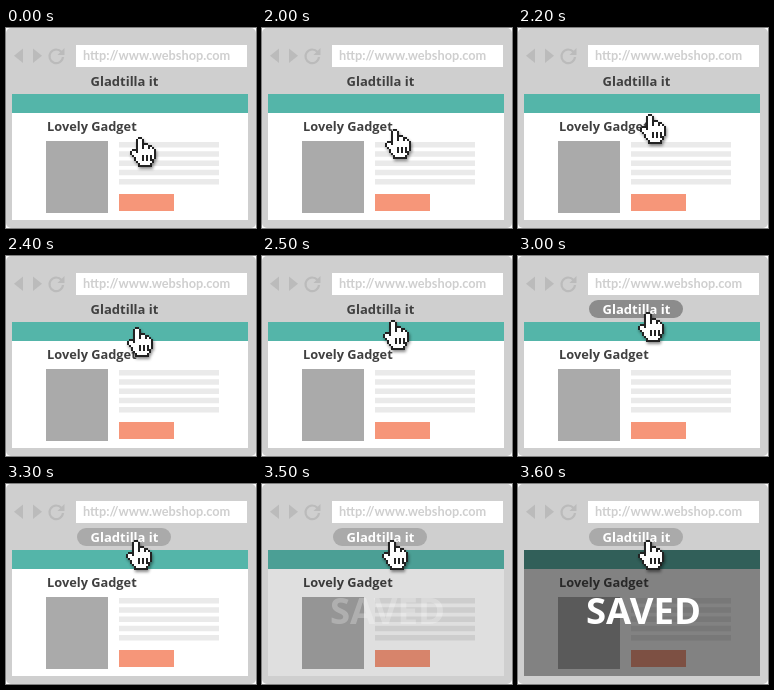
Write an HTML page that moves like this. It is 250 px wide and 200 px high and loops after 5600 ms.

```html
<!DOCTYPE html>
<html lang="en">
<head>
<meta charset="utf-8">
<title>Save to list</title>
<style>
  html, body { margin: 0; width: 100%; height: 100%; overflow: hidden; background: #fff; }
  svg { display: block; width: 100vw; height: 100vh; }
  text { font-family: "Open Sans", "Noto Sans", sans-serif; font-weight: 700; }
  .url { font-family: Lato, "Open Sans", sans-serif; }
  #hand { filter: drop-shadow(1px 2px 1.5px rgba(0, 0, 0, .45)); }
</style>
</head>
<body>
<svg viewBox="0 0 250 200">
  <rect width="250" height="200" rx="5" fill="#cfcfcf"/>

  <g fill="#bbb">
    <path d="M17 20.5v14.5L8 27.75zM27 20.5v14.5L36 27.75z"/>
    <path d="M55.5 24A6.8 6.8 0 1 0 57 29" fill="none" stroke="#bbb" stroke-width="2.2"/>
    <path d="M58.5 20v7H51.5z"/>
  </g>
  <rect x="70" y="17" width="171" height="22" fill="#fff"/>
  <text class="url" x="77" y="32" font-size="12.75" fill="#cfcfcf">http://www.webshop.com</text>

  <rect id="pill" x="71" y="44" width="94" height="18" rx="9"/>
  <text id="label" x="118.5" y="58" font-size="13" text-anchor="middle">Gladtilla it</text>

  <rect x="6" y="66" width="236" height="126" fill="#fff"/>
  <rect x="6" y="66" width="236" height="19" fill="#54b5a9"/>
  <text x="41" y="103" font-size="12.8" fill="#404040">Lovely Gadget</text>
  <rect x="40" y="113" width="62" height="72" fill="#aaa"/>
  <g id="lines" fill="#eaeaea"></g>
  <rect x="113" y="166" width="55" height="17" fill="#f69679"/>

  <rect id="shade" x="6" y="66" width="236" height="126" fill="#141414"/>
  <text id="saved" x="125.5" y="139.5" font-size="36.5" text-anchor="middle" fill="#fff">SAVED</text>

  <g id="hand">
    <g transform="scale(2)" shape-rendering="crispEdges">
      <path fill="#222" d="M4 0h2v1h1v2h2v1h2v1h1v1h1v5h-1v2h-1v2h-7v-2h-1v-1h-1v-2h-1v-1h-1v-2h1v-1h2v-5h1z"/>
      <path fill="#fff" d="M4 1h2v5h1v-2h2v2h1v-1h1v1h1v5h-1v2h-1v1h-5v-1h-1v-1h-1v-2h-1v-1h-1v-2h2v1h1z"/>
      <path fill="#222" d="M6 9h1v3h-1zM8 9h1v3h-1zM10 9h1v3h-1z"/>
    </g>
  </g>
</svg>
<script>
const LOOP = 5600;
const $ = id => document.getElementById(id);
const set = (id, name, value) => $(id).setAttribute(name, value);

for (let i = 0; i < 5; i++) {
  const bar = document.createElementNS("http://www.w3.org/2000/svg", "rect");
  const box = { x: 113, y: 114 + i * 9.25, width: 100, height: 5.5 };
  for (const key in box) bar.setAttribute(key, box[key]);
  $("lines").append(bar);
}

function draw(t) {
  // The pointer climbs in seven equal steps, 100 ms apart.
  const step = t < 2000 ? 0 : Math.min(7, Math.floor((t - 2000) / 100) + 1);
  const p = step / 7;
  const x = Math.round(124 - 4 * p);
  const y = Math.round(109 - 53 * p);
  set("hand", "transform", `translate(${x} ${y})`);

  const hover = t >= 2600;
  const pressed = t >= 3000 && t < 3300;
  set("pill", "opacity", hover ? 1 : 0);
  set("pill", "fill", pressed ? "#8c8c8c" : "#aaa");
  set("label", "fill", hover ? "#fff" : "#404040");

  const fade = t < 3500 ? 0 : t < 3600 ? 0.25 : 1;
  set("shade", "opacity", 0.53 * fade);
  set("saved", "opacity", fade);
}

const start = performance.now();
function tick() {
  draw((performance.now() - start) % LOOP);
  requestAnimationFrame(tick);
}
draw(0);
requestAnimationFrame(tick);
</script>
</body>
</html>
```
